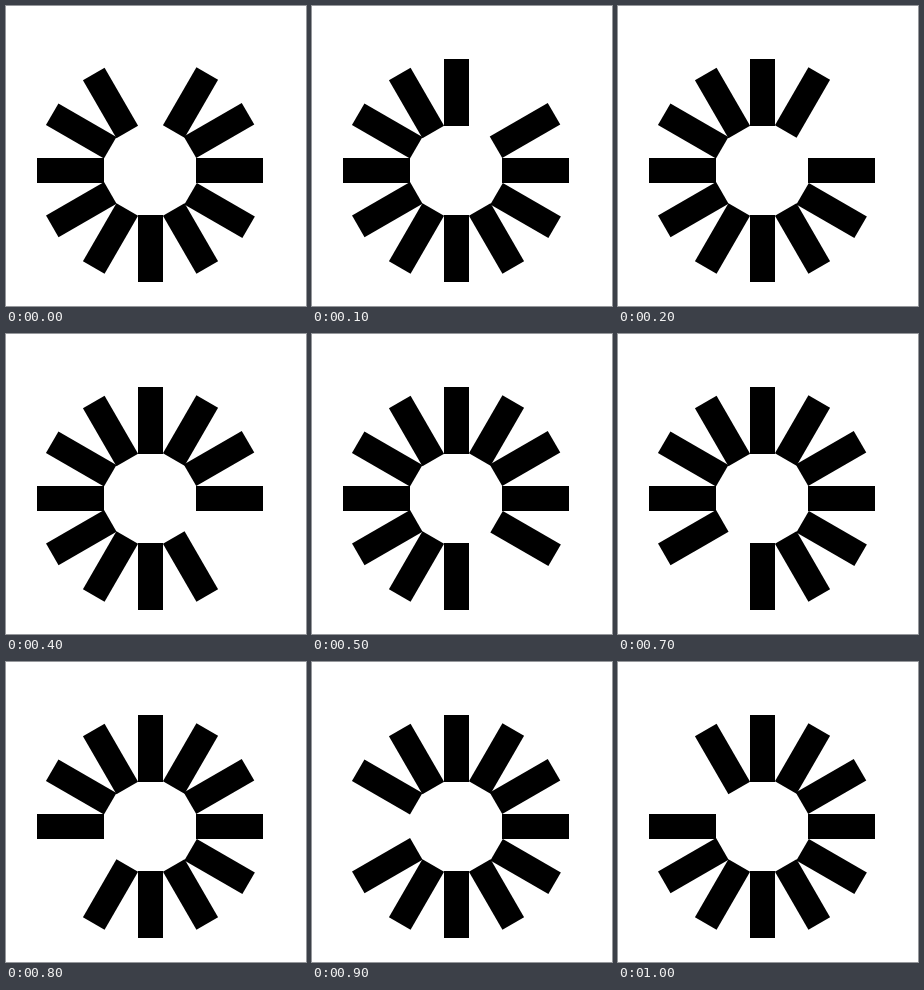
Recreate the animation shown at these times as an HTML page. Size 300 by 300 pixels, loop 1100 ms.

```html
<!DOCTYPE html>
<html lang="en">
<head>
<meta charset="utf-8">
<title>Spinner</title>
<style>
  html, body { margin: 0; width: 100%; height: 100%; overflow: hidden; background: #fff; }
  svg { display: block; width: 300px; height: 300px; }
</style>
</head>
<body>
<svg viewBox="0 0 300 300"></svg>
<script>
const STEP = 100, STEPS = 11;
const LENGTH = 67, WIDTH = 25;

// Centres of the spokes, clockwise from the top, 30 degrees apart.
const centres = [
  [144.5, 86.5], [184.5, 96.5], [213, 124.5], [223.5, 164.5],
  [213.6, 204.5], [184.5, 232.5], [144.5, 242.5], [104.5, 232.5],
  [75.3, 203.7], [64.5, 164.5], [75.2, 125], [104.5, 97]
];

const svg = document.querySelector('svg');
const spokes = centres.map(([x, y], i) => {
  const bar = document.createElementNS(svg.namespaceURI, 'rect');
  const attrs = {
    x: -WIDTH / 2, y: -LENGTH / 2, width: WIDTH, height: LENGTH,
    transform: `translate(${x} ${y}) rotate(${i % 3 ? i * 30 : i * 30 % 180})`
  };
  for (const name in attrs) bar.setAttribute(name, attrs[name]);
  return svg.appendChild(bar);
});

const start = performance.now();

// One spoke is hidden per step; the last spoke always stays.
function draw(now) {
  const hidden = Math.floor(Math.max(0, now - start) / STEP) % STEPS;
  spokes.forEach((bar, i) => {
    bar.style.visibility = i === hidden ? 'hidden' : 'visible';
  });
  requestAnimationFrame(draw);
}
draw(start);
</script>
</body>
</html>
```
